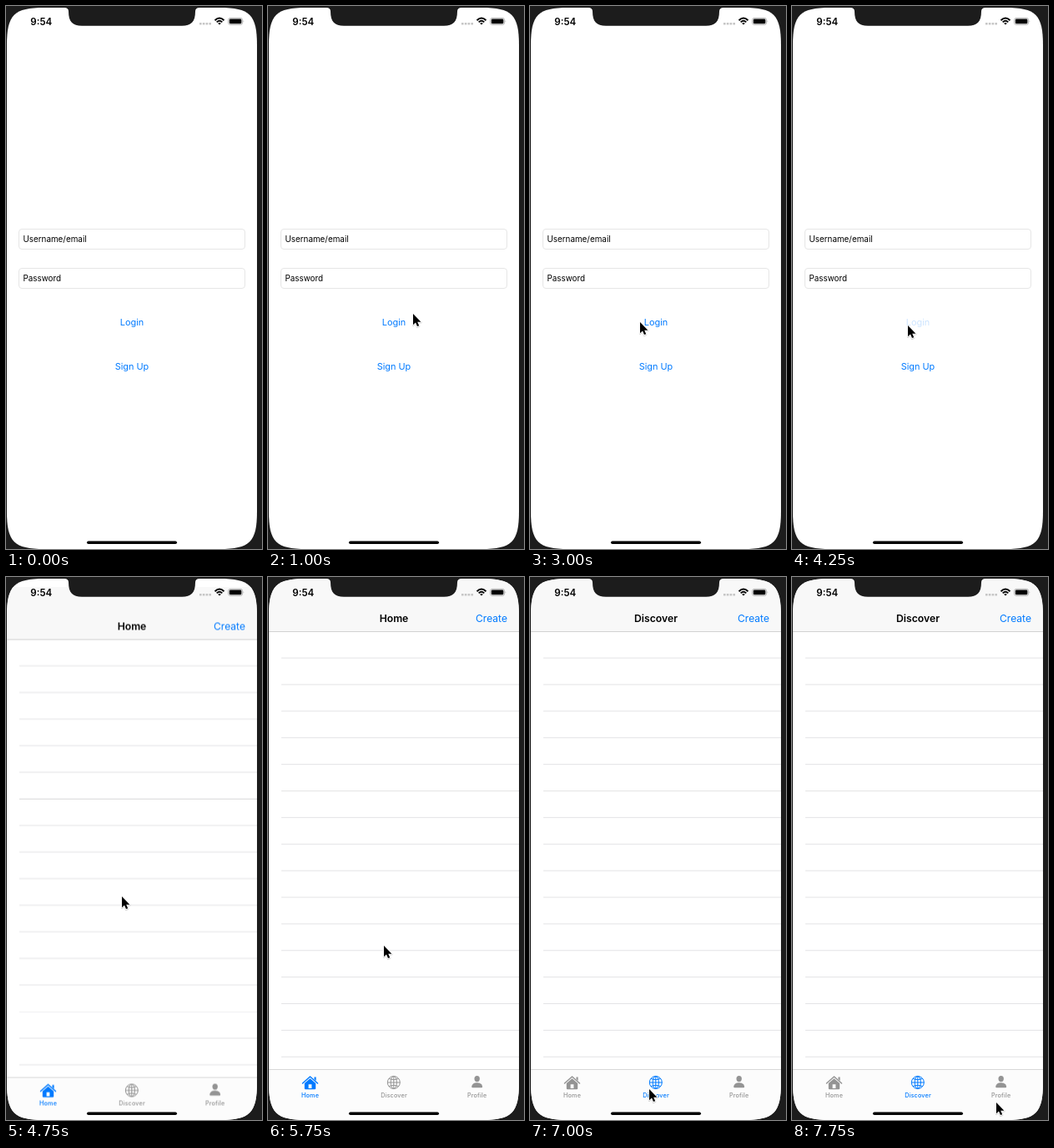
An HTML page for the animation above (8 s loop, 307 by 651 pixels).

```html
<!DOCTYPE html>
<html lang="en">
<head>
<meta charset="utf-8">
<title>App walkthrough</title>
<style>
  html, body { margin: 0; width: 100%; height: 100%; overflow: hidden; background: #1c1c1c; }
  svg { display: block; width: 307px; height: 651px; font-family: Inter, Roboto, sans-serif; }
  :root { --blue: #007aff; --gray: #949494; }

  .link { fill: var(--blue); }
  .mid { text-anchor: middle; }
  .title { font-size: 12.2px; font-weight: 600; text-anchor: middle; }
  .tab { color: var(--gray); fill: currentColor; }
  .tab text { font-size: 7.25px; font-weight: 500; letter-spacing: .15px; text-anchor: middle; }
  .globe { fill: none; stroke: currentColor; stroke-width: 1; }

  /* Every change is a hard cut on an 8 s loop. */
  .step { animation: 8s step-end infinite; }
  #login { animation-name: press; }
  #page { animation-name: present; }
  #pointer { animation-name: point; }
  .leaving { animation-name: leave; }
  .entering { animation-name: enter; }
  #homeTab { animation-name: deselect; }
  #discoverTab { animation-name: select; }

  @keyframes press { 0% { opacity: 1 } 53.125%, 100% { opacity: .2 } }
  @keyframes present {
    0% { transform: translateY(651px) }
    56.25% { transform: translateY(301px) }
    59.375% { transform: translateY(9.5px) }
    62.5%, 100% { transform: none }
  }
  @keyframes leave { 0% { opacity: 1 } 87.5%, 100% { opacity: 0 } }
  @keyframes enter { 0% { opacity: 0 } 87.5%, 100% { opacity: 1 } }
  @keyframes deselect { 0% { color: var(--blue) } 87.5%, 100% { color: var(--gray) } }
  @keyframes select { 0% { color: var(--gray) } 87.5%, 100% { color: var(--blue) } }
  @keyframes point {
    0% { transform: translate(-40px, 0) }
    12.5% { transform: translate(172px, 368px) }
    15.625% { transform: translate(198px, 398px) }
    25% { transform: translate(196px, 400px) }
    28.125% { transform: translate(131px, 463px) }
    31.25% { transform: translate(141px, 441px) }
    34.375% { transform: translate(145px, 427px) }
    37.5% { transform: translate(130px, 378px) }
    40.625% { transform: translate(137px, 382px) }
    71.875% { transform: translate(137px, 441px) }
    75% { transform: translate(179px, 614px) }
    78.125% { transform: translate(145px, 614px) }
    81.25% { transform: translate(141px, 613px) }
    93.75% { transform: translate(180px, 613px) }
    96.875%, 100% { transform: translate(243px, 629px) }
  }
</style>
</head>
<body>
<svg viewBox="0 0 307 651">
  <defs>
    <clipPath id="screen">
      <path d="M1 47C1 10.500 9.500 2 46 2H256C292.500 2 301 10.500 301 47V606C301 642.500 292.500 651 256 651H46C9.500 651 1 642.500 1 606Z"/>
    </clipPath>
    <pattern id="rows" y="65.700" width="307" height="31.880" patternUnits="userSpaceOnUse">
      <path d="M16 31.380H301" stroke="#e3e3e5"/>
    </pattern>
  </defs>

  <g clip-path="url(#screen)">
    <rect width="307" height="651" fill="#fff"/>

    <g fill="#fff" stroke="#e6e6e6">
      <rect x="15.500" y="267.500" width="271" height="24" rx="3.500"/>
      <rect x="15.500" y="314.500" width="271" height="24" rx="3.500"/>
    </g>
    <g font-size="9.900">
      <text x="20.400" y="283.200">Username/email</text>
      <text x="20.400" y="330.200">Password</text>
    </g>
    <g class="link mid" font-size="10.900">
      <text id="login" class="step" x="151" y="382.700">Login</text>
      <text x="151" y="436.400">Sign Up</text>
    </g>

    <g id="page" class="step">
      <rect x="1" y="2" width="300" height="649" fill="#fff"/>
      <rect x="1" y="66" width="300" height="524" fill="url(#rows)"/>
      <rect x="1" y="2" width="300" height="63.500" fill="#f8f8f8"/>
      <path d="M1 65.500H301" stroke="#d2d2d2"/>
      <text class="title step leaving" x="151" y="54.200">Home</text>
      <text class="title step entering" x="151" y="54.200">Discover</text>
      <text class="link" x="287" y="54.200" font-size="12.100" text-anchor="end">Create</text>

      <rect x="1" y="590" width="300" height="61" fill="#fcfcfc"/>
      <path d="M1 590.500H301" stroke="#d8d8d8"/>
      <g id="homeTab" class="tab step">
        <path d="M41.500 607L50.500 599L59.500 607" fill="none" stroke="currentColor" stroke-width="1.500" stroke-linecap="round" stroke-linejoin="round"/>
        <path d="M55.500 599.500H57.600V604L55.500 602Z"/>
        <path fill-rule="evenodd" d="M50.500 601.200L57.200 607V613.200Q57.200 614.300 56 614.300H45Q43.800 614.300 43.800 613.200V607ZM48.600 608.200V613H52.400V608.200Z"/>
        <text x="50.600" y="623.700">Home</text>
      </g>
      <g id="discoverTab" class="tab step">
        <g class="globe">
          <circle cx="150.800" cy="606" r="7.500"/>
          <ellipse cx="150.800" cy="606" rx="3.600" ry="7.500"/>
          <path d="M150.800 598.500V613.500M143.300 606H158.300M145 601.500Q150.800 604 156.600 601.500M145 610.500Q150.800 608 156.600 610.500"/>
        </g>
        <text x="151" y="623.700">Discover</text>
      </g>
      <g class="tab">
        <ellipse cx="250.700" cy="601.600" rx="3.200" ry="3.600"/>
        <path d="M244.200 611Q244.800 606.300 250.700 606.300T257.200 611Q257.200 612.200 256 612.200H245.400Q244.200 612.200 244.200 611Z"/>
        <text x="250.700" y="623.700">Profile</text>
      </g>
    </g>

    <!-- Status bar -->
    <text x="29.300" y="22.600" font-size="11.600" font-weight="600">9:54</text>
    <path d="M232 21.300H246" stroke="#c6c6c6" stroke-width="2.400" stroke-dasharray="2.600 1.200"/>
    <g fill="none" stroke="#000" stroke-width="1.900">
      <path d="M250.500 17.200Q256 11.900 261.500 17.200"/>
      <path d="M252.700 19.400Q256 16.300 259.300 19.400"/>
    </g>
    <path d="M254.200 20.700Q256 19.300 257.800 20.700L256 22.600Z"/>
    <rect x="266.600" y="14.400" width="17" height="8" rx="2.300" fill="none" stroke="#a5a5a5" stroke-width=".8"/>
    <rect x="267.800" y="15.500" width="14.600" height="5.800" rx="1.300"/>
    <path d="M284.600 17.100Q286 18.400 284.600 19.700Z" fill="#a0a0a0"/>
    <rect x="97" y="641.400" width="108" height="3.600" rx="1.800"/>
  </g>

  <path fill="#1c1c1c" d="M70 0V2Q75 2 75 6.500C75 19 80 23.800 91 23.800H211C222 23.800 227 19 227 6.500Q227 2 232 2V0Z"/>

  <g id="pointer" class="step" stroke-linejoin="round">
    <path d="M2 2V15L5 12.300L7 17L9.300 16L7.200 11.500H11.500Z" fill="none" stroke="#000" stroke-opacity=".16" stroke-width="2.200"/>
    <path d="M2 1V14.200L5 11.400L7 16.100L9.200 15.200L7.200 10.700H11.400Z" stroke="#fff" stroke-width="1.600" paint-order="stroke"/>
  </g>
</svg>
</body>
</html>
```
